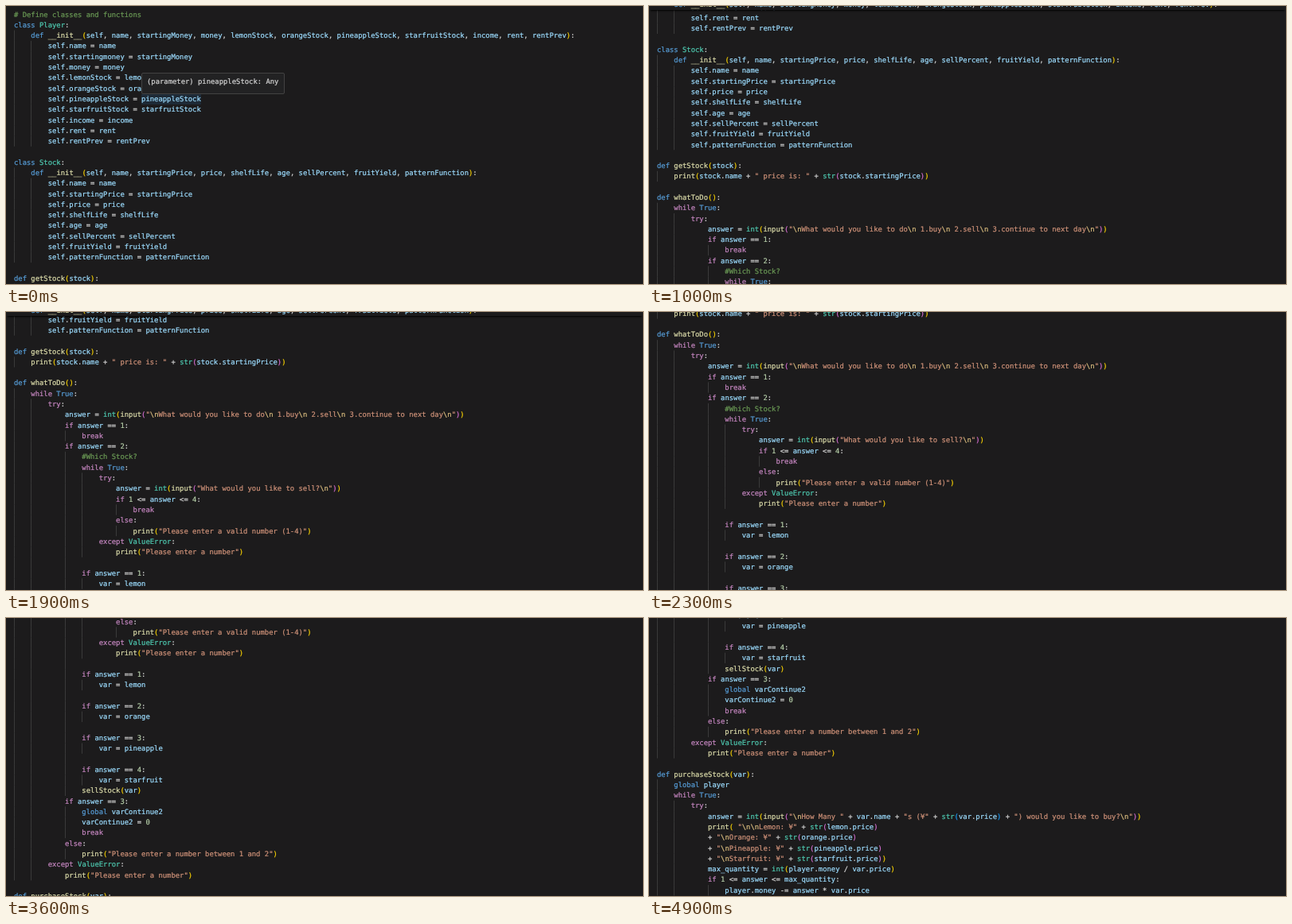
Animation of 800x350 px, one loop 5000 ms. Source, as an HTML page:

```html
<!DOCTYPE html>
<html lang="en">
<head>
<meta charset="utf-8">
<title>Scrolling through code</title>
<style>
  html, body { margin: 0; width: 100%; height: 100%; overflow: hidden; background: #1c1b1c; }
  #stage { position: relative; width: 800px; height: 350px; overflow: hidden; background: #1c1b1c; }
  #stage div { position: absolute; }
  .code {
    font: 12px/18px "DejaVu Sans Mono", monospace;
    text-rendering: geometricPrecision;
    -webkit-text-stroke: .3px;
    white-space: pre;
    color: #d4d4d4;
    transform-origin: 0 0;
    scale: .7385;
  }
  .code div { left: 0; height: 18px; }
  #code { left: 9.6px; top: 4.4px; }
  #code .guide {
    background: repeating-linear-gradient(90deg, #3a3a3a 0 1px, transparent 1px 28.9px);
  }
  #sticky {
    left: 0; width: 800px; height: 13.3px;
    background: #1c1b1c;
    box-shadow: 0 3px 2px -2px #000;
  }
  #sticky .code { left: 9.6px; top: 0; }
  #word { left: 169.6px; top: 110.7px; width: 75px; height: 13.3px; background: #1e2a36; }
  #tip {
    left: 170px; top: 84px; width: 178px; height: 25px;
    background: #222223; border: 1px solid #424242; border-radius: 2px;
  }
  #tip .code { left: 6px; top: 2.5px; }
  .ctl { color: #c586c0 } .key { color: #569cd6 } .type { color: #4ec9b0 }
  .fn { color: #dcdcaa } .id { color: #9cdcfe } .num { color: #b5cea8 }
  .str { color: #ce9178 } .esc { color: #d7ba7d } .com { color: #6a9955 }
  .b0 { color: #ffd700 } .b1 { color: #da70d6 } .b2 { color: #179fff }
</style>
</head>
<body>
<div id="stage">
  <div id="word"></div>
  <div id="code" class="code"></div>
  <div id="sticky"><div class="code"></div></div>
  <div id="tip"><div class="code">(parameter) pineappleStock: Any</div></div>
</div>
<script>
const SOURCE = String.raw`# Define classes and functions
class Player:
    def __init__(self, name, startingMoney, money, lemonStock, orangeStock, pineappleStock, starfruitStock, income, rent, rentPrev):
        self.name = name
        self.startingmoney = startingMoney
        self.money = money
        self.lemonStock = lemonStock
        self.orangeStock = orangeStock
        self.pineappleStock = pineappleStock
        self.starfruitStock = starfruitStock
        self.income = income
        self.rent = rent
        self.rentPrev = rentPrev

class Stock:
    def __init__(self, name, startingPrice, price, shelfLife, age, sellPercent, fruitYield, patternFunction):
        self.name = name
        self.startingPrice = startingPrice
        self.price = price
        self.shelfLife = shelfLife
        self.age = age
        self.sellPercent = sellPercent
        self.fruitYield = fruitYield
        self.patternFunction = patternFunction

def getStock(stock):
    print(stock.name + " price is: " + str(stock.startingPrice))

def whatToDo():
    while True:
        try:
            answer = int(input("\nWhat would you like to do\n 1.buy\n 2.sell\n 3.continue to next day\n"))
            if answer == 1:
                break
            if answer == 2:
                #Which Stock?
                while True:
                    try:
                        answer = int(input("What would you like to sell?\n"))
                        if 1 <= answer <= 4:
                            break
                        else:
                            print("Please enter a valid number (1-4)")
                    except ValueError:
                        print("Please enter a number")

                if answer == 1:
                    var = lemon

                if answer == 2:
                    var = orange

                if answer == 3:
                    var = pineapple

                if answer == 4:
                    var = starfruit
                sellStock(var)
            if answer == 3:
                global varContinue2
                varContinue2 = 0
                break
            else:
                print("Please enter a number between 1 and 2")
        except ValueError:
            print("Please enter a number")

def purchaseStock(var):
    global player
    while True:
        try:
            answer = int(input("\nHow Many " + var.name + "s (¥" + str(var.price) + ") would you like to buy?\n"))
            print( "\n\nLemon: ¥" + str(lemon.price)
            + "\nOrange: ¥" + str(orange.price)
            + "\nPineapple: ¥" + str(pineapple.price)
            + "\nStarfruit: ¥" + str(starfruit.price))
            max_quantity = int(player.money / var.price)
            if 1 <= answer <= max_quantity:
                player.money -= answer * var.price`;

const LINE = 18 * .7385, TOP = 4.4;
const $ = id => document.getElementById(id);
const esc = s => s.replace(/&/g, '&amp;').replace(/</g, '&lt;');
const span = (cls, s) => `<span class="${cls}">${s}</span>`;

// Syntax colouring; bracket depth carries over between lines
const TOKEN = /#.*|"[^"]*"|[A-Za-z_]\w*|\d+|[()]|[^\w"#()]+/g;
let depth = 0;

function wordClass(word, before, after) {
  if (/^(if|while|try|else|except|break)$/.test(word)) return 'ctl';
  if (/^(def|class|global|True)$/.test(word)) return 'key';
  if (/^(int|str|ValueError)$/.test(word) || before.endsWith('class ')) return 'type';
  return after.startsWith('(') ? 'fn' : 'id';
}

function paint(line) {
  return line.replace(TOKEN, (tok, at) => {
    const s = esc(tok), c = tok[0];
    if (c === '#') return span('com', s);
    if (c === '"') return span('str', s.replace(/\\n/g, m => span('esc', m)));
    if (c === '(') return span('b' + depth++ % 3, s);
    if (c === ')') return span('b' + --depth % 3, s);
    if (/\d/.test(c)) return span('num', s);
    if (/\w/.test(c)) return span(wordClass(tok, line.slice(0, at), line.slice(at + tok.length)), s);
    return s;
  });
}

const lines = SOURCE.split('\n');
const indent = i => lines[i] ? lines[i].search(/\S/) / 4 : indent(i + 1);
const painted = lines.map(paint);
$('code').innerHTML = painted.map((html, i) =>
  `<div class="guide" style="top:${i * 18}px;width:${indent(i) * 28.9 - .5}px"></div>` +
  `<div style="top:${i * 18}px">${html}</div>`).join('');

// Pinned header of the enclosing method
const PIN_TOP = -8.8;
const scopes = [{ head: 2, last: 12 }, { head: 15, last: 23 }];
const lineTop = i => TOP + i * LINE;
let pinned = null;

function pin(scroll) {
  const scope = scopes.find(s =>
    lineTop(s.head) - scroll < PIN_TOP && lineTop(s.last + 1) - scroll > PIN_TOP);
  $('sticky').style.display = scope ? '' : 'none';
  if (!scope) return;
  if (scope !== pinned) {
    $('sticky').firstChild.innerHTML = painted[scope.head];
    pinned = scope;
  }
  $('sticky').style.top = Math.min(PIN_TOP, lineTop(scope.last) - scroll) + 'px';
}

// Scroll path: [ms, px], joined by monotone cubic curves
const path = [[0, 0], [300, 14], [600, 52], [1000, 141.8], [1900, 293.4], [2800, 428.4],
  [3600, 551], [3800, 552.4], [3900, 552.4], [4400, 609.3], [4900, 704.7]];
const rate = path.slice(1).map(([t, y], i) => (y - path[i][1]) / (t - path[i][0]));
const slope = path.map((_, i) => {
  if (i === 0) return 0;
  if (i === rate.length) return rate[i - 1];
  const a = rate[i - 1], b = rate[i];
  return a * b > 0 ? 2 * a * b / (a + b) : 0;
});

function scrollAt(t) {
  let i = 0;
  while (i < path.length - 2 && t > path[i + 1][0]) i++;
  const [t0, y0] = path[i], [t1, y1] = path[i + 1];
  const d = t1 - t0, u = (t - t0) / d, v = 1 - u;
  return y0 * v * v * (1 + 2 * u) + y1 * u * u * (3 - 2 * u)
    + d * u * v * (slope[i] * v - slope[i + 1] * u);
}

const LOOP = 5000, STEP = 100;
const start = performance.now();

function draw() {
  const t = Math.floor((performance.now() - start) % LOOP / STEP) * STEP;
  const scroll = scrollAt(t);
  $('code').style.translate = `0 ${-scroll}px`;
  $('tip').style.display = $('word').style.display = t < STEP ? '' : 'none';
  pin(scroll);
  requestAnimationFrame(draw);
}
draw();
</script>
</body>
</html>
```
